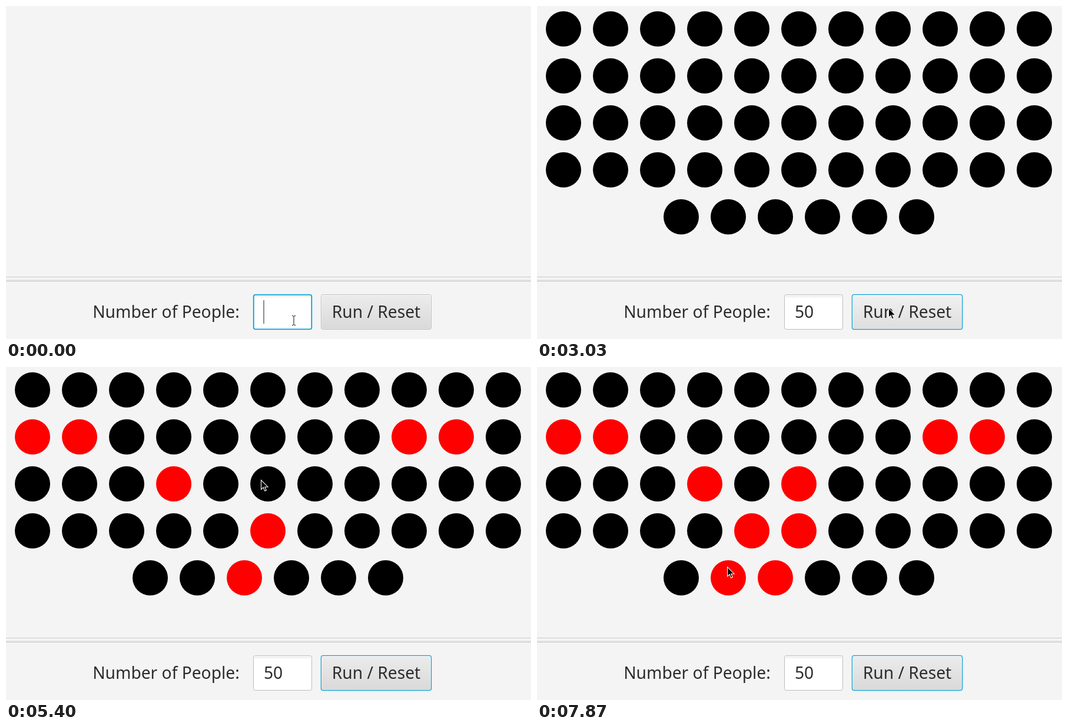
Animation, 892 px wide and 567 px high, one loop 8 s. Source, as an HTML page:

```html
<!DOCTYPE html>
<html lang="en">
<head>
<meta charset="utf-8">
<title>Number of People</title>
<style>
  html, body { margin: 0; width: 100%; height: 100%; overflow: hidden; background: #f4f4f4; }
  svg { display: block; }
  text { font: 28.2px "Noto Sans", "Open Sans", sans-serif; fill: #2c2c2c; }
</style>
</head>
<body>
<svg id="stage" width="892" height="567" viewBox="0 0 892 567">
  <defs>
    <linearGradient id="face" x2="0" y2="1"><stop id="faceTop"/><stop id="faceBottom" offset="1"/></linearGradient>
    <linearGradient id="bevel" x2="0" y2="1"><stop stop-color="#fcfcfc"/><stop offset="1" stop-color="#e4e4e4"/></linearGradient>
    <linearGradient id="shade" x2="0" y2="1"><stop stop-color="#ececec"/><stop offset="1" stop-color="#fff"/></linearGradient>
  </defs>
  <rect width="892" height="567" fill="#f4f4f4"/>
  <g id="people"></g>

  <rect y="461" width="892" height="8" fill="#c4c4c4"/>
  <rect y="462" width="892" height="6" fill="url(#bevel)"/>

  <text x="147.2" y="531">Number of People:</text>

  <rect id="fieldGlow" x="419.5" y="490.5" width="101" height="61" rx="4" fill="none" stroke="#039ed3" stroke-opacity=".2"/>
  <rect id="field" rx="3" fill="#fff"/>
  <rect x="422" y="493" width="96" height="5" fill="url(#shade)"/>
  <text id="digits" x="438" y="531"></text>
  <rect id="caret" y="501" width="1.4" height="40" fill="#5a5a5a"/>

  <rect id="buttonGlow" x="534.5" y="490.5" width="189" height="61" rx="4" fill="none" stroke="#039ed3" stroke-opacity=".2"/>
  <rect id="button" rx="3" fill="url(#face)"/>
  <rect id="buttonEdge" x="536.5" y="492.5" width="185" height="57" rx="2" fill="none" stroke="url(#bevel)"/>
  <text x="629" y="531" text-anchor="middle">Run / Reset</text>

  <g id="beam" fill="none" stroke-linecap="square">
    <path id="beamShape" d="M-2.5-8h1.5l1 1 1-1h1.5M0-7V7M-2.5 8h1.5l1-1 1 1h1.5" stroke="#fff" stroke-width="3"/>
    <use href="#beamShape"/>
    <path d="M-2.5-8h1.5l1 1 1-1h1.5M0-7V7M-2.5 8h1.5l1-1 1 1h1.5" stroke="#111"/>
  </g>
  <path id="arrow" d="M0 0V16L3.7 12.5 6.2 18.6 8.8 17.5 6.3 11.7H11.4Z" fill="#000" stroke="#fff" stroke-width="1.1"/>
</svg>
<script>
const LOOP = 8000, FRAME = 1000 / 30;
const $ = id => document.getElementById(id);
const set = (id, attrs) => {
  for (const [name, value] of Object.entries(attrs)) $(id).setAttribute(name, value);
};
const show = (id, on) => set(id, { visibility: on ? "visible" : "hidden" });

// Pointer stops: time, x, y
const pointerPath = [
  [0, 489, 535.5], [2200, 489, 535.5], [2430, 597.5, 514.5],
  [3567, 597.5, 514.5], [3830, 450, 251.5], [3970, 446.5, 269.5],
  [4440, 446.5, 269.5], [4470, 447.5, 268.5],
  [4637, 447.5, 268.5], [5000, 444, 140.5], [5400, 433.5, 192.5],
  [5700, 433.5, 192.5], [6130, 324.5, 248.5],
  [6567, 324.5, 248.5], [6700, 347.5, 265.5],
  [7167, 347.5, 265.5], [7667, 323.5, 340.5], [LOOP, 323.5, 340.5]
];

// Time each person turns red, keyed by "row,column"
const redAt = {
  "1,0": 4300, "1,1": 4300, "1,8": 4300, "1,9": 4300, "2,3": 4300, "3,5": 4300, "4,2": 4300,
  "2,5": 5600, "3,4": 6900, "4,1": 7870
};

const people = [11, 11, 11, 11, 6].flatMap((count, row) =>
  Array.from({ length: count }, (_, col) => {
    const dot = document.createElementNS("http://www.w3.org/2000/svg", "circle");
    const left = 445 - (count - 1) * 40;
    for (const [name, value] of [["cx", left + col * 80], ["cy", 39 + row * 80], ["r", 30]])
      dot.setAttribute(name, value);
    $("people").append(dot);
    return { dot, redAt: redAt[[row, col]] ?? Infinity };
  }));

function pointerAt(ms) {
  const t = Math.floor((ms + 5) / FRAME) * FRAME + 1;
  const i = Math.max(1, pointerPath.findIndex(stop => stop[0] > t));
  const [t0, x0, y0] = pointerPath[i - 1], [t1, x1, y1] = pointerPath[i];
  const p = (t - t0) / (t1 - t0), ease = p * p * (3 - 2 * p);
  return [x0 + (x1 - x0) * ease, y0 + (y1 - y0) * ease].map(v => Math.round(v * 2) / 2);
}

function box(id, x, width, focused) {
  const inset = focused ? 0.8 : 0.5;
  set(id, {
    x: x + inset, y: 491 + inset, width: width - 2 * inset, height: 60 - 2 * inset,
    stroke: focused ? "#039ed3" : "#bcbcbc", "stroke-width": focused ? 1.6 : 1
  });
  show(id + "Glow", focused);
}

function draw(t) {
  const pressed = t >= 2770 && t < 3030;
  const buttonFocused = t >= 2770;
  const [x, y] = pointerAt(t);
  const inField = x < 520 && y > 490;
  const hover = x > 535 && x < 723 && y > 491;

  show("people", t >= 3030);
  for (const { dot, redAt } of people) dot.setAttribute("fill", t >= redAt ? "#f00" : "#000");

  const typed = t < 1670 ? "" : t < 1770 ? "5" : "50";
  $("digits").textContent = typed;
  set("caret", { x: 437.3 + typed.length * 16 });
  show("caret", t < 470 || (t >= 970 && t < 1470) || (t >= 1670 && t < 2270));
  box("field", 420, 100, !buttonFocused);

  box("button", 535, 188, buttonFocused);
  show("buttonEdge", !pressed);
  const [top, bottom] = pressed ? ["#dedede", "#cbcbcb"] : hover ? ["#f1f1f1", "#dedede"] : ["#ececec", "#d9d9d9"];
  set("faceTop", { "stop-color": top });
  set("faceBottom", { "stop-color": bottom });

  show("beam", inField);
  show("arrow", !inField);
  for (const id of ["beam", "arrow"]) set(id, { transform: `translate(${x} ${y})` });
}

const start = performance.now();
function tick() {
  draw((performance.now() - start) % LOOP);
  requestAnimationFrame(tick);
}
tick();
</script>
</body>
</html>
```
